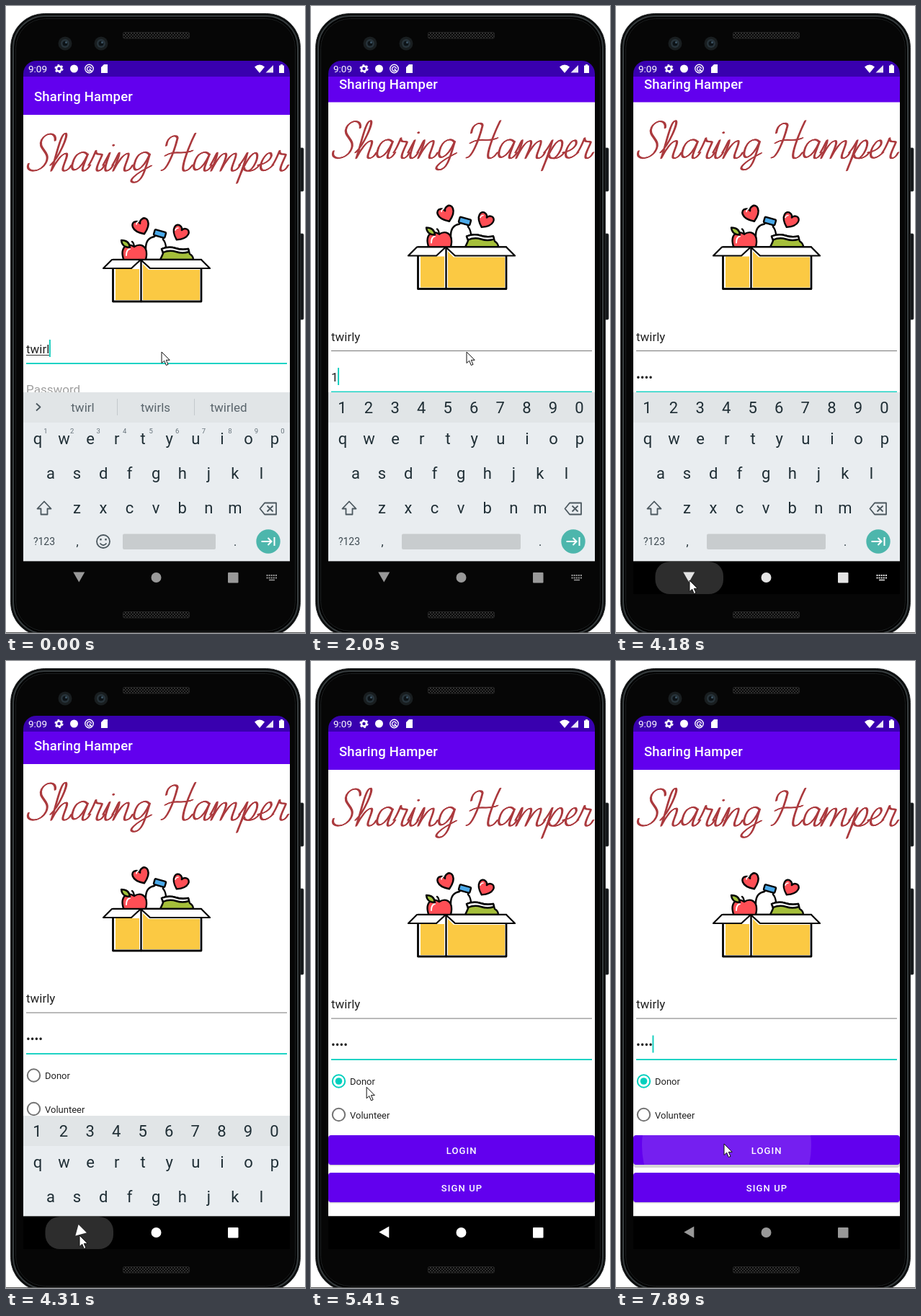
An HTML page for the animation above (8 s loop, 415 px wide and 870 px high).

```html
<!DOCTYPE html>
<html lang="en">
<head>
<meta charset="utf-8">
<title>Login screen</title>
<style>
html, body { margin: 0; width: 100%; height: 100%; overflow: hidden; background: #fff; }
svg { display: block; width: 415px; height: 870px; }
text { font-family: Roboto, sans-serif; white-space: pre; }
.mid { text-anchor: middle; }
.key { font-size: 22px; fill: #1f2e35; }
.hint { font-size: 9.5px; fill: #66727a; }
.word { font-size: 17px; fill: #59646b; }
.field { font-size: 17px; fill: #212121; }
.label { font-size: 13px; fill: #222; }
.btn { font-size: 13px; font-weight: 500; letter-spacing: 1.15px; fill: #fff; }
.ink { stroke: #050505; stroke-width: 2.4; stroke-linejoin: round; stroke-linecap: round; }
.line { fill: none; stroke: #4c585f; stroke-width: 1.8; stroke-linejoin: round; }
</style>
</head>
<body>
<svg viewBox="0 0 415 870">
  <defs>
    <clipPath id="screen"><path d="M24 98H394V770.500H24Z"/></clipPath>
    <clipPath id="loginClip"><rect x="24" y="658" width="370" height="41" rx="4"/></clipPath>
    <clipPath id="appleClip"><path d="M155 318H200V352H155Z"/></clipPath>
    <pattern id="mesh" width="4" height="4" patternUnits="userSpaceOnUse">
      <path d="M0 0L4 4M4 0L0 4" stroke="#3a3a3a" stroke-width=".8"/>
    </pattern>
    <path id="heart" d="M0 10C-16 0 -11 -11 -5 -9.5Q-1 -9 0 -5Q1 -9 5 -9.5C11 -11 16 0 0 10Z"/>
  </defs>

  <!-- phone body -->
  <g fill="#15181a" stroke="#2a2e30" stroke-width=".8">
    <rect x="407" y="197" width="6" height="60" rx="1.5"/>
    <rect x="407" y="316" width="6" height="119" rx="1.5"/>
  </g>
  <rect x="6.500" y="10.500" width="402" height="864" rx="47" fill="#0b0c0c" stroke="#24282a"/>
  <rect x="10" y="14" width="395" height="857" rx="44" stroke="#353b3d" stroke-width="2"/>
  <rect x="13.500" y="17.500" width="388" height="850" rx="41" fill="#060606" stroke="#1c1f20"/>
  <rect y="869" width="415" height="1" fill="#555"/>
  <g id="speakers" stroke="#242424"></g>
  <g id="cameras"></g>

  <!-- app -->
  <g clip-path="url(#screen)">
    <rect x="24" y="98" width="370" height="673" fill="#fff"/>
    <g id="page">
      <rect x="24" y="76" width="370" height="75" fill="#6200ee"/>
      <text x="39" y="132" font-size="18.500" font-weight="500" letter-spacing=".2" fill="#fff">Sharing Hamper</text>
      <g id="script" role="img" aria-label="Sharing Hamper" fill="none" stroke="#ab3a3e" stroke-width="1.500" stroke-linecap="round" stroke-linejoin="round"></g>

      <g class="ink">
        <use href="#heart" transform="translate(188 306.5) rotate(-22) scale(1.05)" fill="#ff4e55"/>
        <use href="#heart" transform="translate(241.5 315.5) rotate(28)" fill="#ff4e55"/>
        <path d="M181 303q0-3 3-4M235 311q1-3 4-3" stroke="#fff" stroke-width="1.6" fill="none"/>
        <path d="M194 352V336Q194 322 206 320L207.500 318L218 321V324Q224 330 222 352Z" fill="#fff"/>
        <rect x="-8" y="-4" width="16" height="8" rx="1.5" transform="translate(213.500 316) rotate(16)" fill="#4aa9e9"/>
        <g clip-path="url(#appleClip)">
          <path d="M178 334C166 327 160 337 162 347Q164 360 179 360Q194 360 195 346C196 332 186 329 178 334Z" fill="#ff4e55"/>
          <path d="M167 346q0-8 5-9" stroke="#fff" stroke-width="2" fill="none"/>
        </g>
        <path d="M178 334Q177 328 175 327" fill="none"/>
        <path d="M160 325Q171 325 172 335Q161 335 160 325Z" fill="#9fc03b"/>
        <path d="M214 352Q217 346 218 343L216 337Q226 333 235 336T253 337L255 344Q260 347 260 352Z" fill="#a5bf3a"/>
        <path d="M216 337Q226 333 235 336T253 337L254 341Q245 344 236 341T218 342Z" fill="#fff"/>
        <path d="M148.500 352H271V410H148.500Z" fill="#fff"/>
        <path d="M152 365H185V408H152ZM190 358L198 366H269V408H190Z" fill="#fbc943" stroke="none"/>
        <path d="M187.500 353V410" fill="none"/>
        <path d="M147 352H187L174 364H135ZM187 352H271L283 364H200Z" fill="#fff" stroke-width="2.200"/>
        <path d="M148.500 365V410H271V365" fill="none"/>
      </g>

      <text id="user" class="field" x="28" y="482"></text>
      <rect id="compose" x="28" y="484" height="1" fill="#333"/>
      <rect id="userLine" x="28" width="362"/>
      <text id="pass" class="field" x="28" y="538"></text>
      <rect id="passLine" x="28" width="362"/>
      <rect id="caret" width="2" height="24" fill="#17cfc0"/>

      <g id="donor" fill="none" stroke-width="2">
        <circle cx="38.500" cy="583" r="8.700"/>
        <circle id="dot" cx="38.500" cy="583" r="4.800" fill="#03d0be" stroke="none"/>
      </g>
      <circle cx="38.500" cy="629.500" r="8.700" fill="none" stroke="#737373" stroke-width="2"/>
      <text class="label" x="54" y="588">Donor</text>
      <text class="label" x="54" y="635">Volunteer</text>
      <rect id="loginShade" x="24" y="660" width="370" rx="4" fill="#000" opacity=".16"/>
      <rect x="24" y="712" width="370" height="40.500" rx="4" fill="#000" opacity=".16"/>
      <rect x="24" y="658" width="370" height="41" rx="4" fill="#6200ee"/>
      <rect x="24" y="710" width="370" height="41" rx="4" fill="#6200ee"/>
      <g clip-path="url(#loginClip)"><circle id="ripple" cx="153.500" cy="672" r="117.500" fill="#fff" opacity=".12"/></g>
      <text class="btn mid" x="209.200" y="684">LOGIN</text>
      <text class="btn mid" x="209.500" y="735.500">SIGN UP</text>
    </g>

    <!-- keyboard -->
    <g id="keyboard">
      <rect x="24" y="536" width="370" height="235" fill="#e9edf0"/>
      <rect x="24" y="536" width="370" height="42" fill="#e1e5e7"/>
      <g id="letters"></g>
      <g id="wordRow">
        <path class="line" d="M42 551.500L47.500 556.500L42 561.500"/>
        <path d="M154.500 545V568M261.500 545V568" stroke="#c3c9cc"/>
        <text class="word mid" x="106.500" y="563"></text>
        <text class="word mid" x="207.500" y="563"></text>
        <text class="word mid" x="309" y="563"></text>
        <g class="line">
          <circle cx="135" cy="743" r="9"/>
          <path d="M130.500 745.500Q135 751 139.500 745.500"/>
          <path d="M131.500 739V741.500M138.500 739V741.500" stroke-width="2.400"/>
        </g>
      </g>
      <g id="digitRow"></g>
      <path class="line" d="M53 687.500L62.500 697.500H57.500V705.500H48.500V697.500H43.500Z"/>
      <path class="line" d="M352.500 697.500L359 689.500H375V705.500H359ZM362.500 693.500L370.500 701.500M370.500 693.500L362.500 701.500"/>
      <text class="mid" x="53" y="748" font-size="14" fill="#3f4b52">?123</text>
      <g class="mid" font-size="16" fill="#1f2e35">
        <text x="99" y="749">,</text>
        <text x="318" y="749">.</text>
      </g>
      <rect id="space" y="732.500" height="21.500" rx="2" fill="#c8ccce"/>
      <circle cx="364" cy="743" r="16.700" fill="#4db6ac"/>
      <path d="M354.500 743H368M363.500 738L368.500 743L363.500 748M372.500 737V749" fill="none" stroke="#fff" stroke-width="2"/>
    </g>
  </g>

  <!-- status bar -->
  <path d="M24 98V94A18 18 0 0 1 42 76H376A18 18 0 0 1 394 94V98Z" fill="#3900af"/>
  <g fill="#fff">
    <text x="31" y="92" font-size="13.500">9:09</text>
    <circle cx="73.500" cy="87" r="3.500" fill="none" stroke="#fff" stroke-width="2.600"/>
    <circle cx="73.500" cy="87" r="5.300" fill="none" stroke="#fff" stroke-width="1.600" stroke-dasharray="2.770"/>
    <circle cx="94.500" cy="87" r="5.500"/>
    <circle cx="115.500" cy="87" r="5.700" fill="none" stroke="#fff" stroke-width="1.400"/>
    <path d="M117.500 89.500A3 3 0 1 1 118.500 87M115.500 87L119 90.500" fill="none" stroke="#fff" stroke-width="1.400"/>
    <path d="M132 85L136 81H141V93H132Z"/>
    <path d="M345 84.500Q352 78.500 359 84.500L352 93Z"/>
    <path d="M371 82V92.500H360.500Z" opacity=".9"/>
    <path d="M379 82.500H381V81H384V82.500H386V93H379Z"/>
  </g>

  <!-- navigation -->
  <rect id="navBar" x="24" y="770.500" width="370" height="45.500"/>
  <rect id="pill" x="54.500" y="771" width="94.500" height="45" rx="20"/>
  <g id="nav">
    <path id="back" d="M-8 -7H8L0 7Z" stroke-linejoin="round"/>
    <circle cx="208.500" cy="793" r="7"/>
    <rect x="308" y="786" width="14.500" height="14.500" rx="1"/>
    <g id="imeIcon">
      <path d="M361.500 790H376M361.500 793.500H376" stroke-width="2" stroke-dasharray="2 1.100" fill="none"/>
      <path d="M365 796.500H373" stroke-width="1.500"/>
    </g>
  </g>
  <path id="mouse" d="M0 0V15.500L3.700 12.200L6.300 18.500L9 17.400L6.300 11.300H11.200Z" fill="#fff" stroke="#111"/>
</svg>

<script>
const LOOP = 8000;
const NS = 'http://www.w3.org/2000/svg';
const $ = id => document.getElementById(id);

function set(el, attrs) {
  for (const k in attrs) el.setAttribute(k, attrs[k]);
  return el;
}
function add(parent, tag, attrs, text) {
  const el = set(document.createElementNS(NS, tag), attrs);
  if (text !== undefined) el.textContent = text;
  return parent.appendChild(el);
}
const show = (id, on) => { $(id).style.display = on ? '' : 'none'; };

// last entry whose start time has passed
const at = (steps, t) => steps.filter(s => s[0] <= t).pop()[1];

// Pen strokes on a baseline at 0: [advance, path]
const glyphs = {
  S: [34, 'M32-42C31-54 16-54 13-43C10-30 30-27 27-12C24 3 1 4 3-10'],
  H: [44, 'M2-35C0-50 14-51 15-45C15-22 10 1 4-1M38-52C33-32 29 0 36 0C41 0 43-4 45-8M4-21C16-30 27-21 40-28'],
  h: [27, 'M0-8C9-18 15-50 10-52C3-53 5-20 3 0C6-12 12-25 18-24C23-22 14 0 21 0C25 0 28-4 29-8'],
  a: [26, 'M21-22C16-29 3-27 3-10C3 4 16 2 21-23C19-8 17 0 21 0C24 0 27-4 28-8'],
  r: [20, 'M0-8C3-14 4-22 5-28C6-20 14-25 15-22C15-18 9 0 15 0C19 0 21-4 22-8'],
  i: [13, 'M0-8L5-25C4-12 2 0 7 0C10 0 13-4 14-8M7-36l1 1'],
  n: [27, 'M0-8C3-16 4-24 5-25C7-22 4-8 3 0C6-12 12-25 18-24C22-22 14 0 20 0C25 0 27-4 28-8'],
  m: [40, 'M0-8C3-16 4-24 5-25C7-22 4-8 3 0C6-12 11-25 17-24C21-22 17-8 16 0C19-12 25-25 31-24C35-22 27 0 33 0C38 0 40-4 41-8'],
  g: [26, 'M21-22C16-29 3-27 3-10C3 4 16 2 21-23C20 0 20 16 9 16C-2 15 8 4 27-7'],
  p: [26, 'M0-8C4-14 6-22 7-25C7-10 5 4 3 17C5 0 10-24 18-25C26-24 22 1 13 0C10 0 8-2 8-4M15 0C21 1 26-4 28-8'],
  e: [20, 'M0-8C12-10 18-18 14-24C9-28 3-16 4-8C5 3 14 1 21-8']
};

function write(word, x) {
  for (const ch of word) {
    const [advance, d] = glyphs[ch];
    for (let nib = 0; nib < 3; nib++) {
      add($('script'), 'path', { d, transform: `translate(${x + nib * .8} ${229 - nib * .3}) skewX(-14)` });
    }
    x += advance;
  }
}

function build() {
  write('Sharing', 25);
  write('Hamper', 211);

  for (const y of [36.5, 840.5]) {
    add($('speakers'), 'rect', { x: 162.5, y, width: 92, height: 8.5, rx: 2, fill: 'url(#mesh)' });
  }
  for (const cx of [82, 132]) {
    const rings = [[9.5, '#191e20'], [6, '#28343b'], [3.5, '#0d1317']];
    for (const [r, fill] of rings) add($('cameras'), 'circle', { cx, cy: 52, r, fill });
    add($('cameras'), 'circle', { cx: cx + 1.5, cy: 50.5, r: 1.5, fill: '#3e5667' });
  }

  const rows = [['qwertyuiop', 44, 608], ['asdfghjkl', 62, 656], ['zxcvbnm', 98.5, 704]];
  for (const [keys, x, y] of rows) {
    [...keys].forEach((k, i) => add($('letters'), 'text', { class: 'key mid', x: x + i * 36.55, y }, k));
  }
  [...'1234567890'].forEach((n, i) => {
    const x = 44 + i * 36.55;
    add($('wordRow'), 'text', { class: 'hint mid', x: x + 11, y: 593 }, n);
    add($('digitRow'), 'text', { class: 'key mid', x: x - .5, y: 565 }, n);
  });
}

const scroll = [[0, 0], [1030, 7], [1150, 15], [1310, 17.5], [4310, 8], [4430, 0]];
const secret = [[0, ''], [2050, '1'], [2330, '•2'], [2460, '••3'], [2770, '•••4'], [4100, '••••']];
const pillFill = [[0, 'none'], [4050, '#2d2d2d'], [4430, '#1c1c1c'], [4560, 'none']];
const backTurn = [[0, 0], [4310, 45], [4430, 90]];
const words = [[0, ['twirl', 'twirls', 'twirled']], [150, ['twirly', 'Twirly', 'twirling']]];
const track = [
  [0, 216, 480], [3330, 216, 480], [4050, 102, 797], [4430, 102, 797], [4950, 68, 584],
  [5350, 68, 584], [5690, 119, 625], [6000, 134, 645], [7060, 134, 645], [7600, 150, 670], [LOOP, 150, 670]
];

function pointer(t) {
  const i = track.findIndex(p => p[0] > t);
  const [t0, x0, y0] = track[i - 1], [t1, x1, y1] = track[i];
  const k = (t - t0) / (t1 - t0);
  return [x0 + (x1 - x0) * k, y0 + (y1 - y0) * k];
}

function caretOn(t) {
  if (t < 3180) return !(t >= 580 && t < 1030) && !(t >= 1590 && t < 2050);
  return (t - 100) % 1000 >= 500;
}

function navShade(t) {
  if (t < 4050) return 153;
  if (t < 4310) return 228;
  const k = Math.min(1, Math.max(0, (t - 6300) / 1300));
  return Math.round(255 - 102 * k);
}

function underline(id, y, focused) {
  set($(id), focused
    ? { y: y - 1, height: 2, fill: '#1fd3c4' }
    : { y: y - .5, height: 1, fill: '#777' });
}

function render(t) {
  const onUser = t < 1030, digits = t >= 1310;
  set($('page'), { transform: `translate(0 ${-at(scroll, t)})` });

  $('user').textContent = t < 150 ? 'twirl' : 'twirly';
  const userWidth = $('user').getComputedTextLength();
  set($('compose'), { width: userWidth });
  show('compose', onUser);
  underline('userLine', 496, onUser);
  underline('passLine', 553, !onUser);

  const typed = at(secret, t);
  $('pass').textContent = typed || 'Password';
  $('pass').style.fill = typed ? '' : '#a0a0a0';
  const passWidth = typed ? $('pass').getComputedTextLength() : 0;
  set($('caret'), onUser ? { x: 27.5 + userWidth, y: 463 } : { x: 27.5 + passWidth, y: 519.5 });
  show('caret', caretOn(t));

  const picked = t >= 5130;
  set($('donor'), { stroke: picked ? '#03d0be' : '#737373' });
  show('dot', picked);
  const pressed = t >= 7890;
  show('ripple', pressed);
  set($('loginShade'), { height: pressed ? 43 : 40.5 });

  show('keyboard', t < 4430);
  set($('keyboard'), { transform: `translate(0 ${t < 4310 ? 0 : 95})` });
  show('wordRow', !digits);
  show('digitRow', digits);
  set($('space'), { x: digits ? 126 : 162, width: digits ? 165 : 129 });
  const offered = at(words, t);
  document.querySelectorAll('.word').forEach((el, i) => { el.textContent = offered[i]; });

  const n = navShade(t), tone = `rgb(${n},${n},${n})`;
  set($('navBar'), { fill: t < 4050 ? '#060606' : '#000' });
  set($('nav'), { fill: tone, stroke: 'none' });
  set($('imeIcon'), { stroke: tone });
  show('imeIcon', t < 4310);
  set($('back'), { transform: `translate(101.3 792.5) rotate(${at(backTurn, t)})` });
  set($('pill'), { fill: at(pillFill, t) });

  const [mx, my] = pointer(t);
  set($('mouse'), { transform: `translate(${mx} ${my})` });
}

build();
const start = performance.now();
function tick() {
  render((performance.now() - start) % LOOP);
  requestAnimationFrame(tick);
}
tick();
</script>
</body>
</html>
```
